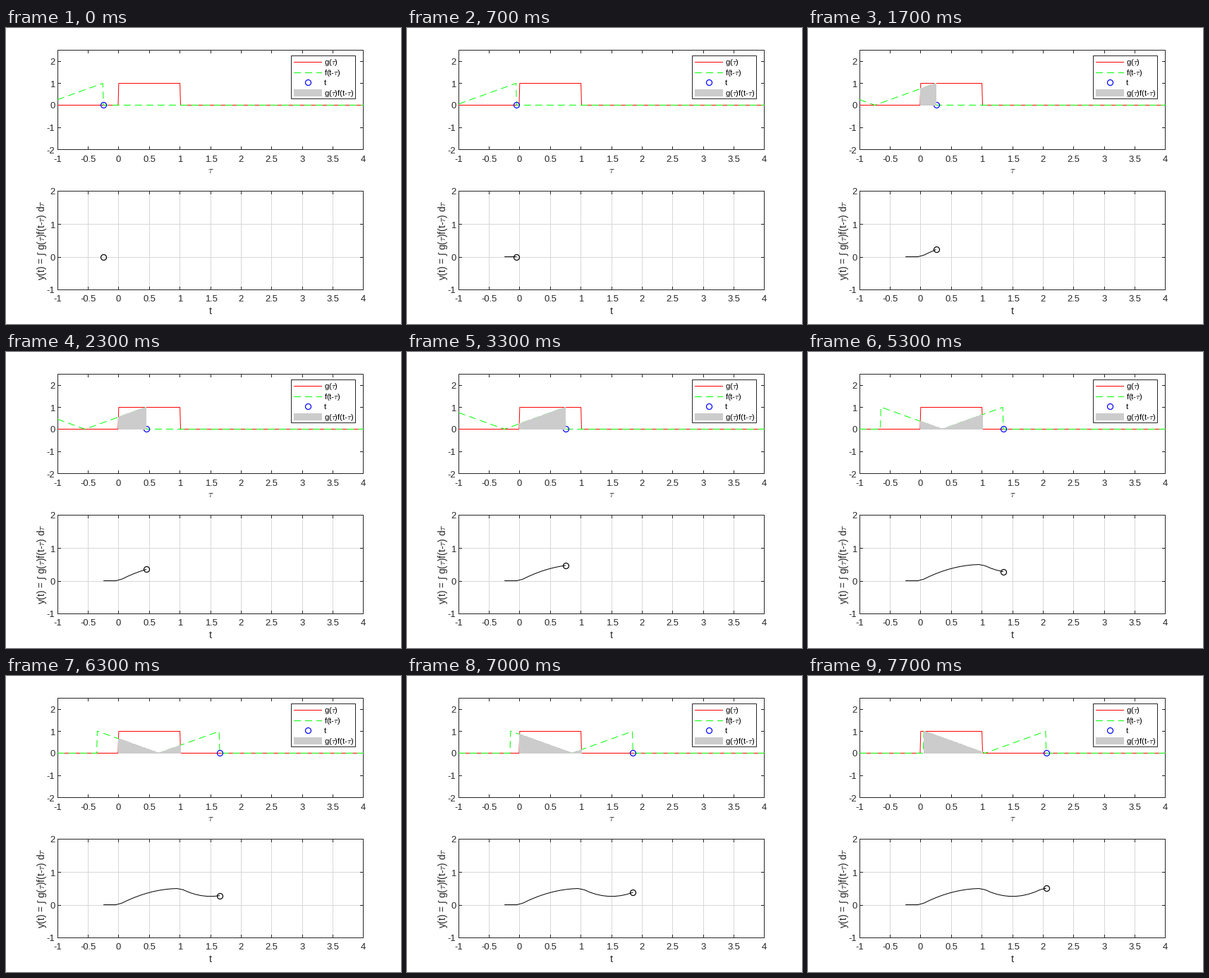
These frames come from a looping animation (560x420 px, 8 s). A matplotlib script:

```python
import matplotlib.pyplot as plt
import numpy as np
from matplotlib.animation import FuncAnimation
from matplotlib.patches import Polygon, Rectangle

W, H, DPI = 560, 420, 100
PT = 72 / DPI  # points per pixel
INK = "#262626"
GRID = "#d8d8d8"
SHADE = "#cccccc"
DASH = (10, 6)
LEFT, RIGHT = 73.5, 506.5

plt.rcParams.update({
    "font.family": "Liberation Sans",
    "mathtext.fontset": "cm",
    "path.snap": False,
})

fig = plt.figure(figsize=(W / DPI, H / DPI), dpi=DPI, facecolor="white")
ax = fig.add_axes([0, 0, 1, 1])
ax.set_xlim(0, W)
ax.set_ylim(H, 0)
ax.axis("off")


def x_px(v):
    return 73.04 + 86.786 * (np.asarray(v) + 1)


def top_px(v):
    return 109.45 - 31.27 * np.asarray(v)


def low_px(v):
    return 324.6 - 46.65 * np.asarray(v)


def column(x):
    return np.floor(x) + 0.5


def row(y):
    return np.floor(y + 0.5) + 0.5


def line(x, y, color, z, **kw):
    return ax.plot(x, y, color=color, lw=PT, zorder=z,
                   solid_capstyle="butt", dash_capstyle="butt", **kw)[0]


def ring(x, y, color):
    return ax.plot([x], [y], "o", ms=8 * PT, mew=1.2 * PT, mfc="none",
                   mec=color, zorder=6)[0]


def text(x, y, s, size, color=INK, **kw):
    ax.text(x, y, s, fontsize=size * PT, color=color, va="baseline", **kw)


def box(x0, y0, x1, y1, z):
    ax.add_patch(Rectangle((x0, y0), x1 - x0, y1 - y0, fill=False,
                           ec=INK, lw=PT, zorder=z))


def panel(y_px, lo, hi, y_ticks, grid):
    y0, y1 = row(y_px(hi)), row(y_px(lo))
    for v in np.arange(-1, 4.1, 0.5):
        x = column(x_px(v))
        if grid:
            line([x, x], [y0, y1], GRID, 0)
        line([x, x], [y0, y0 + 4.5], INK, 1)
        line([x, x], [y1 - 4.5, y1], INK, 1)
        text(x, y1 + 17, f"{v:g}", 13, ha="center")
    for v in y_ticks:
        y = row(y_px(v))
        if grid:
            line([LEFT, RIGHT], [y, y], GRID, 0)
        line([LEFT, LEFT + 4.5], [y, y], INK, 1)
        line([RIGHT - 4.5, RIGHT], [y, y], INK, 1)
        text(69.5, y + 5, f"{v:g}", 13, ha="right")
    box(LEFT, y0, RIGHT, y1, 1)


def legend():
    box(404.5, 39.5, 495.5, 100.5, 3)
    line([408, 448], [48.5, 48.5], "red", 4)
    line([408, 448], [63.5, 63.5], "lime", 4, dashes=DASH)
    ring(428, 77, "blue")
    ax.add_patch(Rectangle((408, 87), 40, 10, fc=SHADE, lw=0, zorder=4))
    names = [r"g($\tau$)", r"f(t-$\tau$)", "t", r"g($\tau$)f(t-$\tau$)"]
    for y, name in zip((52, 67, 81, 96.5), names):
        text(451, y, name, 11.3, "black")


def g(u):
    return np.where((u >= 0) & (u <= 1), 1.0, 0.0)


def f(u):
    return np.where((u > 0) & (u <= 2), np.abs(u - 1), 0.0)


STEP = 0.01
tau = np.round(np.arange(-1, 4 + STEP / 2, STEP), 4)
times = np.round(-0.25 + 0.1 * np.arange(24), 4)
shifted = [f(np.round(t - tau, 4)) for t in times]
products = [s * g(tau) for s in shifted]
y_out = np.array([p.sum() * STEP for p in products])

panel(top_px, -2, 2.5, range(-2, 3), False)
panel(low_px, -1, 2, range(-1, 3), True)
text(290, 206.5, r"$\tau$", 13, ha="center")
text(290, 406.5, "t", 14, ha="center")
text(54.5, 301.5, r"y(t) = ∫ g($\tau$)f(t-$\tau$) d$\tau$", 13.7,
     ha="center", rotation=90, rotation_mode="anchor")
legend()

area = Polygon([[0, 0], [0, 0], [0, 0]], fc=SHADE, lw=0, aa=False, zorder=7)
ax.add_patch(area)
line(x_px(tau), row(top_px(g(tau))), "red", 4)
f_line = line([], [], "lime", 5, dashes=DASH)
y_line = line([], [], "black", 5)
t_ring = ring(0, 0, "blue")
y_ring = ring(0, 0, "black")


def update(frame):
    k = (3 * frame + 1) // 10  # three steps per second
    x = x_px(times[k])
    f_line.set_data(x_px(tau), top_px(shifted[k]))
    # each sample is held until the next one
    area.set_xy(np.column_stack([np.repeat(x_px(tau), 2)[1:],
                                 np.repeat(top_px(products[k]), 2)[:-1]]))
    y_line.set_data(x_px(times[:k + 1]), low_px(y_out[:k + 1]))
    t_ring.set_data([x], [top_px(0)])
    y_ring.set_data([x], [low_px(y_out[k])])
    return f_line, area, y_line, t_ring, y_ring


anim = FuncAnimation(fig, update, frames=80, interval=100,
                     repeat=True, repeat_delay=0, blit=False)
plt.show()
```
